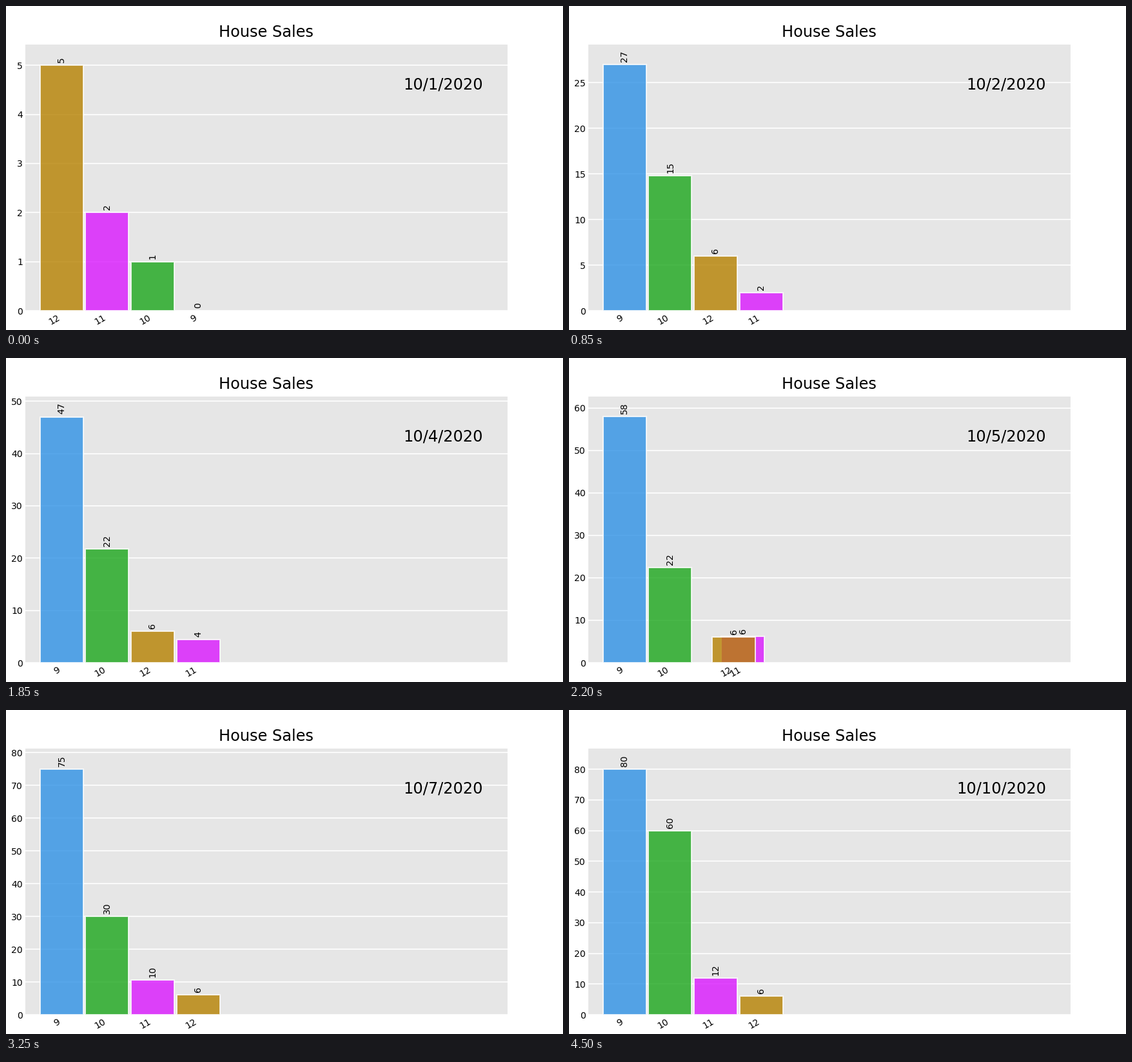
These frames come from a looping animation (864x504 px, 4550 ms). A matplotlib script:

```python
import matplotlib.pyplot as plt
import numpy as np
from matplotlib.animation import FuncAnimation

W, H, DPI = 864, 504, 144
STEPS = 10       # animation steps per day
HEADROOM = 0.0769  # share of the axis kept free above the tallest bar

# Running totals per house size, one value per day
SALES = {
    "9": [0, 20, 30, 40, 50, 70, 70, 80, 80, 80],
    "10": [1, 12, 16, 21, 22, 23, 25, 35, 40, 60],
    "11": [2, 2, 2, 3, 5, 8, 10, 11, 12, 12],
    "12": [5, 6, 6, 6, 6, 6, 6, 6, 6, 6],
}
COLORS = ["#2E91E5", "#1CA71C", "#DA16FF", "#B68100"]

names = list(SALES)
daily = np.array(list(SALES.values()), float)
daily_rank = (-daily).argsort(axis=0, kind="stable").argsort(axis=0) + 1
days = daily.shape[1]
total = (days - 1) * STEPS + 1


def tween(rows):
    keys = np.arange(days) * STEPS
    return np.array([np.interp(np.arange(total), keys, row) for row in rows])


values, places = tween(daily), tween(daily_rank)

# The axis top trails the tallest bar: its headroom uses the previous scale
tops = [values[:, 0].max() / (1 - HEADROOM)]
for peak in values[:, 1:].max(axis=0):
    tops.append(peak + HEADROOM * tops[-1])

plt.rcParams["font.family"] = "DejaVu Sans"
fig = plt.figure(figsize=(W / DPI, H / DPI), dpi=DPI, facecolor="white")
ax = fig.add_axes([30 / W, 30 / H, 747.6 / W, 413.52 / H], facecolor="0.9")
ax.set_title("House Sales", fontsize=12)
ax.set_xlim(0.2, 10.8)
ax.set_axisbelow(True)
ax.grid(True, axis="y", color="white")
ax.tick_params(length=0, labelsize=7, pad=2)
ax.yaxis.set_major_formatter("{x:,.0f}")
ax.spines[:].set_visible(False)

bars = ax.bar(places[:, 0], values[:, 0], width=0.95, color=COLORS,
              ec="white", lw=1, alpha=0.8)
labels = [ax.text(0, 0, "", fontsize=7, rotation=90, ha="center", va="bottom")
          for _ in names]
date = ax.text(0.95, 0.85, "", fontsize=12, ha="right", va="center",
               transform=ax.transAxes)


def update(i):
    top = tops[i]
    ax.set_ylim(0, top)
    ax.set_xticks(places[:, i], names, rotation=30, ha="right")
    for bar, label, place, value in zip(bars, labels, places[:, i], values[:, i]):
        bar.set_x(place - bar.get_width() / 2)
        bar.set_height(value)
        label.set_position((place, value + 0.01 * top))
        label.set_text(f"{value:,.0f}")
    date.set_text(f"10/{i // STEPS + 1}/2020")
    return [*bars, *labels, date]


anim = FuncAnimation(fig, update, frames=total, interval=50,
                     repeat=True, repeat_delay=0)
plt.show()
```
